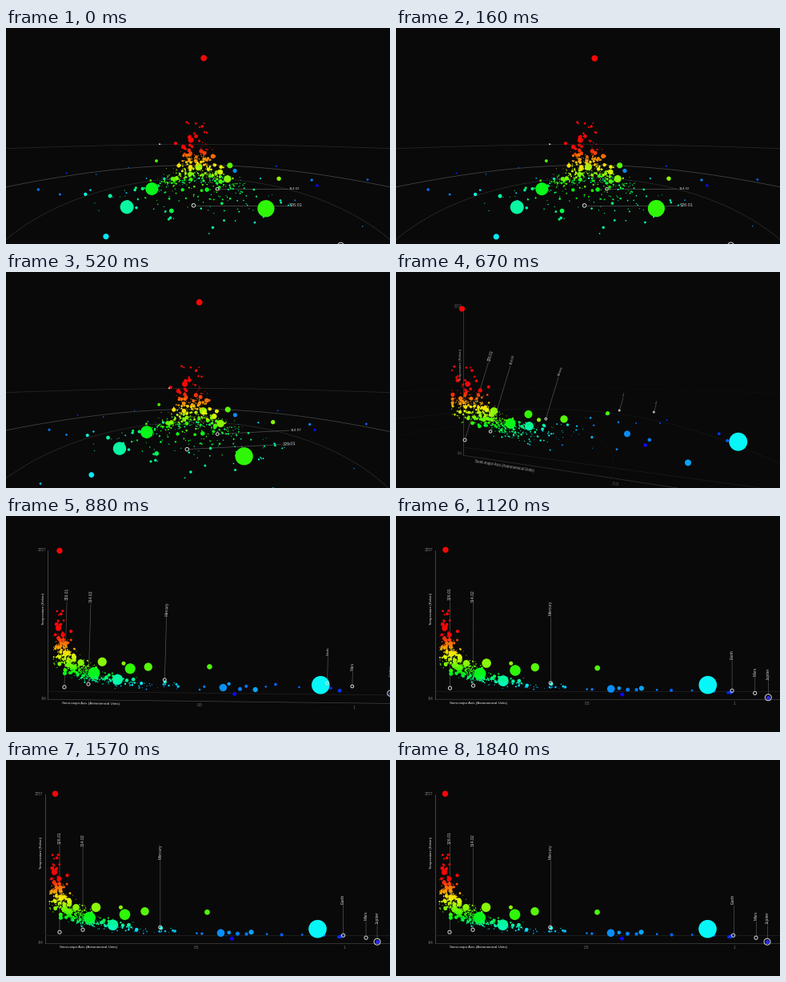
Recreate the animation shown at these times as a matplotlib script. Size 480 px wide and 270 px high, loop 1.87 s.

```python
import colorsys
import matplotlib.pyplot as plt
import numpy as np
from matplotlib.animation import FuncAnimation

W, H, DPI = 480, 270, 100
PX = 72 / DPI                      # points per pixel
EYE = H / 2 / np.tan(np.pi / 6)    # camera distance
AU = 372                           # pixels per astronomical unit
BASE = 94.2                        # ground plane below the view centre
ORIGIN_X = 48.5

plt.rcParams["font.family"] = "Liberation Sans"
rng = np.random.default_rng(11)

# Distance, height, radius, starting angle in degrees
GIANTS = np.array([
    (341, 18, 11.3, -87), (56, 32, 7.5, -284), (85, 23, 6.8, -303),
    (100, 36, 6.8, -393), (125, 40, 5.2, -152), (64, 45, 5.8, -539),
    (220, 13, 4.8, -157), (258, 14, 3.1, -27), (234, 6, 2.5, -115),
    (203, 39, 3.4, -207), (95, 45, 2.5, -79), (13, 187, 3.7, -752),
    (12, 89, 3.6, -590), (28, 85, 2.1, -270), (39, 45, 4.2, -420),
])

# Name, distance in AU, height, starting angle
FEATURES = [
    ("326.01", 0.0497, 14, -704), ("314.02", 0.1277, 17, -504),
    ("Mercury", 0.388, 20, -402), ("Earth", 1.003, 10, -354),
    ("Mars", 1.524, 7, -300), ("Jupiter", 5.2, 2, -193),
]


def speed(d):
    """Degrees turned per step, slower further out."""
    return 1.8 * (13 / d) ** 1.5


def typical_height(d):
    return 62 * (17 / np.maximum(d, 17)) ** 0.65


def flat_distance(d):
    """The flat graph squeezes everything beyond Earth."""
    return d if d < 1.06 * AU else 395.7 + 0.01024 * d


def make_planets():
    """Rows of distance, height, radius and starting angle."""
    n, n_outer, n_hot = 560, 26, 16
    d = np.clip(rng.lognormal(np.log(34), 0.72, n), 6, 230)
    h = typical_height(d) * rng.lognormal(0, 0.17, n)
    r = 0.42 + rng.exponential(0.3, n)
    r += (d < 32) * (rng.random(n) < 0.25) * rng.uniform(0.4, 1.9, n)

    outer_d = np.exp(rng.uniform(np.log(70), np.log(390), n_outer))
    outer_h = typical_height(outer_d) * rng.uniform(0.9, 1.25, n_outer)
    hot_d, hot_h = rng.uniform(7, 20, n_hot), rng.uniform(74, 112, n_hot)

    d = np.r_[d, outer_d, hot_d]
    h = np.maximum(np.r_[h, outer_h, hot_h], 5)
    r = np.r_[r, rng.uniform(1.2, 2.5, n_outer), rng.uniform(0.7, 1.9, n_hot)]
    a = -rng.uniform(0, 360, len(d)) - rng.uniform(100, 500, len(d)) * speed(d)
    return np.vstack([np.c_[d, h, r, a], GIANTS]).T


def heat_color(h):
    hue = np.interp(h, [6, 20, 36, 80], [242, 170, 110, 0])
    return colorsys.hsv_to_rgb(hue / 360, 0.97, 0.97)


dist, height, size, start = make_planets()
colors = np.array([heat_color(h) for h in height])


def remaining(step):
    """How much of the round view is left before it is a flat graph."""
    return min(1.0, 0.72 ** (step - 14.9))


def project(d, angle, h, rem):
    x, z = d * np.cos(angle), d * np.sin(angle)
    near = z > 200
    scale = np.where(near, np.nan, EYE / (EYE - np.where(near, 0, z)))
    cx = ORIGIN_X + (W / 2 - ORIGIN_X) * rem
    return (W / 2 + scale * (cx - W / 2 + x),
            H / 2 + scale * (BASE - h), scale, z)


def area(radius):
    return (2 * radius * PX) ** 2


fig = plt.figure(figsize=(W / DPI, H / DPI), dpi=DPI, facecolor="#090909")
ax = fig.add_axes([0, 0, 1, 1])
ax.set_xlim(0, W)
ax.set_ylim(H, 0)
ax.axis("off")


def line(color, width, **kw):
    return ax.plot([], [], color=color, lw=width * PX, **kw)[0]


def label(text, color, ha="left"):
    return ax.text(0, 0, text, color=color, ha=ha, va="center",
                   rotation_mode="anchor", zorder=6)


DOTTED = (0, (1.5, 1))
RINGS = [(0.5, line("0.25", 0.8, ls=DOTTED)),
         (1.0, line("0.27", 0.8)),
         (5.0, line("0.23", 0.8, ls=DOTTED))]
x_axis, y_axis = line("0.27", 0.7), line("0.32", 0.8)
zero_line = line("0.14", 0.7)
dots = ax.scatter([], [], lw=0, zorder=3)
core = ax.scatter([], [], lw=0, color="#2a2af0", zorder=4)
marks = ax.scatter([], [], facecolors="none", edgecolors="0.85",
                   lw=0.95 * PX, zorder=5)
stems = [line("0.33", 0.7, zorder=2) for _ in FEATURES]
tags = [label(f[0], "0.78") for f in FEATURES]

# Text, distance, height, size in px, upright
AXIS_TEXT = [
    (label("Semi-major Axis (Astronomical Units)", "0.9"), 18, -5, 4.4, False),
    (label("Temperature (Kelvin)", "0.9"), -5, 93, 4.4, True),
    (label("0.5", "0.45", "center"), 190, -5, 4.8, False),
    (label("1", "0.45", "center"), 374, -5, 4.8, False),
    (label("3257", "0.5", "right"), -2, 187, 4.6, False),
    (label("-54", "0.5", "right"), -2, 1, 4.6, False),
]


def draw_rings(rem):
    a = np.linspace(-1.5 * np.pi, 0.5 * np.pi, 500)
    for au, ring in RINGS:
        x, y, _, _ = project(au * AU, a, 0, rem)
        ring.set_data(x, y)
        ring.set_alpha(rem)


def draw_axes(rem, rz):
    alpha = (1 - rem) ** 1.5
    along, up = np.linspace(0, 440, 80), np.array([0, 186])
    for ln, d, h in ((x_axis, along, 0), (zero_line, along, 10),
                     (y_axis, np.zeros(2), up)):
        x, y, _, _ = project(d, rz, h, rem)
        ln.set_data(x, y)
        ln.set_alpha(alpha)
    for text, d, h, px, upright in AXIS_TEXT:
        x, y, s, _ = project(np.array([d, d + 20.0]), rz, h, rem)
        shown = bool(rem < 0.9 and np.isfinite(x).all())
        text.set_visible(shown)
        if not shown:
            continue
        tilt = -np.degrees(np.arctan2(y[1] - y[0], x[1] - x[0]))
        text.set_position((x[0], y[0]))
        text.set_fontsize(px * s[0] * PX)
        text.set_rotation(90 if upright else tilt)
        text.set_alpha(alpha)


def draw_planets(step, rem, rz):
    angle = rz + np.radians(start - speed(dist) * step) * rem
    x, y, s, z = project(dist, angle, height, rem)
    order = np.argsort(z)
    order = order[np.isfinite(s[order])]
    dots.set_offsets(np.c_[x, y][order])
    dots.set_sizes(area(size * s)[order])
    dots.set_facecolors(colors[order])


def draw_features(step, rem, rz):
    lean = np.pi / 2 - rz
    ux, uy = np.cos(lean), -np.sin(lean)
    spots, sizes = [], []
    for (name, au, h, a0), stem, tag in zip(FEATURES, stems, tags):
        true_d = au * AU
        flat_d = flat_distance(true_d)
        d = flat_d + (true_d - flat_d) * rem
        angle = rz + np.radians(a0 - speed(true_d) * step) * rem
        x, y, s, _ = project(d, angle, h, rem)
        shown = bool(np.isfinite(s))
        stem.set_visible(shown)
        tag.set_visible(bool(shown and s > 0.2))
        if not shown:
            continue
        r = 2.1 * s
        if name == "Jupiter":
            r = 4.0 * s
            core.set_offsets([(x, y)])
            core.set_sizes([area(2.5 * s)])
        spots.append((x, y))
        sizes.append(area(r))
        end = max(20, 112 - 0.2 * true_d) * s
        stem.set_data([x + r * ux, x + end * ux], [y + r * uy, y + end * uy])
        tag.set_position((x + (end + 2) * ux, y + (end + 2) * uy))
        tag.set_rotation(np.degrees(lean))
        tag.set_fontsize(max(5.1 * s, 1) * PX)
    marks.set_offsets(spots)
    marks.set_sizes(sizes)


def update(i):
    t = i * 10
    step = 0 if t < 100 else 1 + (t - 100) // 30
    rem = remaining(step)
    rz = np.pi / 2 * rem
    draw_rings(rem)
    draw_axes(rem, rz)
    draw_planets(step, rem, rz)
    draw_features(step, rem, rz)
    return []


anim = FuncAnimation(fig, update, frames=187, interval=10,
                     init_func=lambda: update(0), repeat=True, repeat_delay=0)
plt.show()
```
